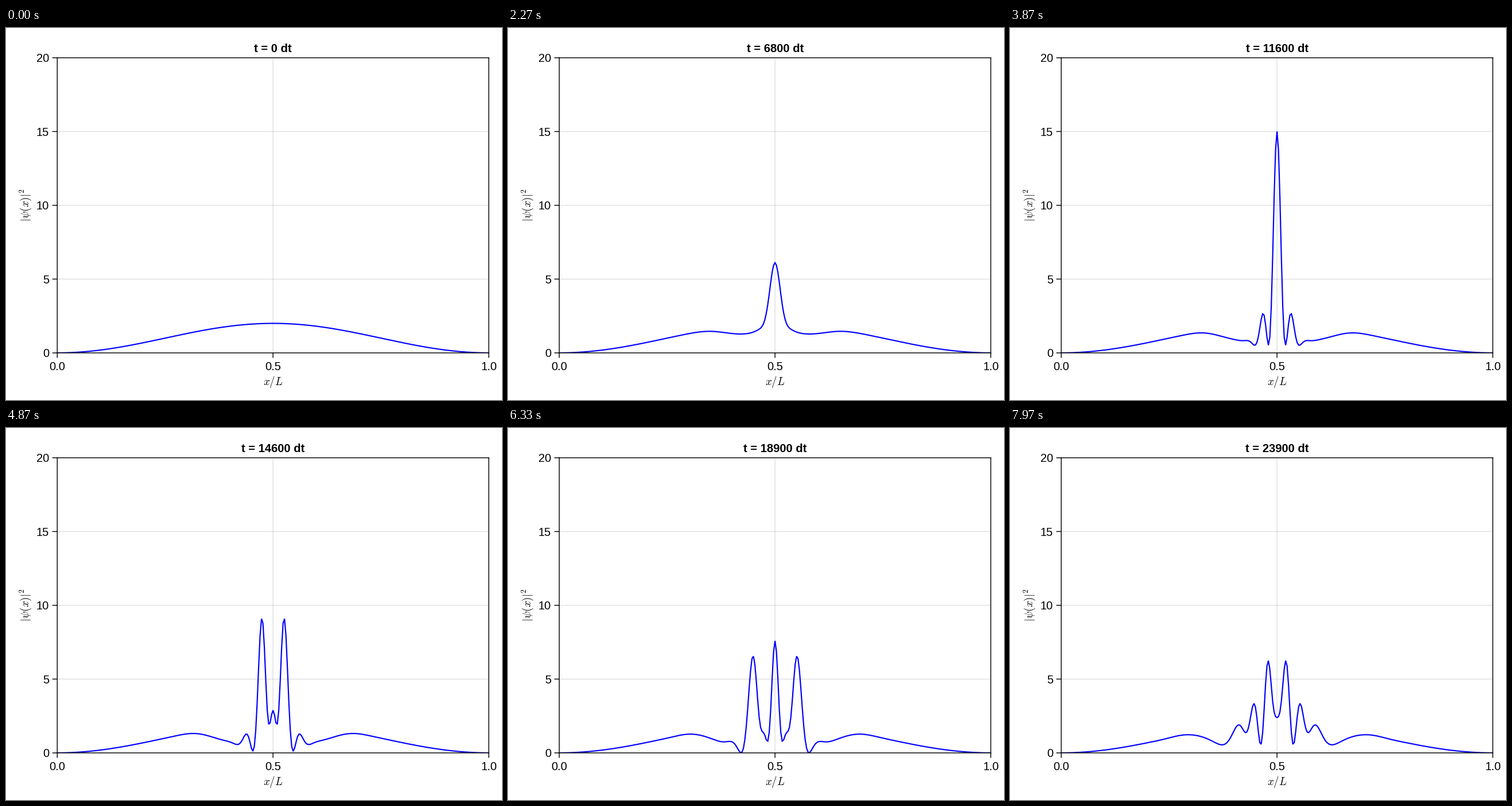
These frames come from a looping animation (864x648 px, 8 s). A matplotlib script:

```python
import numpy as np
import matplotlib.pyplot as plt
from matplotlib.animation import FuncAnimation

W, H, DPI = 864, 648, 72      # one point equals one pixel
U = 1.44                      # layout unit in pixels
LEFT, RIGHT, TOP, BOTTOM = 62 * U, 584 * U, 36 * U, 393 * U
FRAMES, LOOP_MS, STEPS = 240, 8000, 100

plt.rcParams["font.family"] = "Liberation Sans"
plt.rcParams["mathtext.fontset"] = "cm"

# Particle in a box with a Gaussian well, on a finite-difference grid
NX, DT = 301, 1e-7
x = np.linspace(0, 1, NX)
dx = x[1] - x[0]
well = -1e4 * np.exp(-((x - 0.5) ** 2) / (2 * 0.05 ** 2))
hop = np.full(NX - 3, -0.5 / dx ** 2)
hamiltonian = np.diag(well[1:-1] + 1 / dx ** 2) + np.diag(hop, 1) + np.diag(hop, -1)
energy, modes = np.linalg.eigh(hamiltonian)
weights = modes.T @ (np.sqrt(2) * np.sin(np.pi * x[1:-1]))


def density(n):
    """Normalised |psi|^2 after n explicit Euler steps."""
    psi = modes @ (weights * (1 - 1j * energy * DT) ** n)
    p = np.abs(psi) ** 2
    return np.pad(p / (p.sum() * dx), 1)


fig = plt.figure(figsize=(W / DPI, H / DPI), dpi=DPI, facecolor="white")
ax = fig.add_axes([LEFT / W, 1 - BOTTOM / H, (RIGHT - LEFT) / W, (BOTTOM - TOP) / H])
ax.set(xlim=(0, 1), ylim=(0, 20), xticks=[], yticks=[])
for spine in ax.spines.values():
    spine.set(linewidth=U, snap=False, zorder=5)


def label(px, py, text, **style):
    style = {"fontsize": 14 * U, "ha": "center", "va": "baseline", **style}
    return fig.text(px / W, 1 - py / H, text, **style)


def rule(xs, ys, **style):
    line = plt.Line2D(np.array(xs) / W, 1 - np.array(ys) / H, transform=fig.transFigure,
                      linewidth=U, snap=False, solid_capstyle="butt", **style)
    line.set_clip_on(False)
    ax.add_line(line)


GRID = {"color": "black", "alpha": 0.12, "zorder": 1}
TICK = {"color": "black", "zorder": 5}

for value in (0, 0.5, 1):
    px = LEFT + value * (RIGHT - LEFT)
    rule([px, px], [BOTTOM, BOTTOM + 6 * U], **TICK)
    label(px, 596.5, f"{value:.1f}")
    if value == 0.5:
        rule([px, px], [TOP, BOTTOM], **GRID)

for value in range(0, 21, 5):
    py = BOTTOM - value / 20 * (BOTTOM - TOP)
    rule([LEFT - 6 * U, LEFT], [py, py], **TICK)
    label(LEFT - 10 * U, py + 7.2, str(value), ha="right")
    if 0 < value < 20:
        rule([LEFT, RIGHT], [py, py], **GRID)

MID = (LEFT + RIGHT) / 2
label(MID, 622, "$x/L$", fontsize=19)
label(34, (TOP + BOTTOM) / 2, r"$|\psi(x)|^2$", fontsize=19, rotation=90, va="center")
title = label(MID, 41.5, "", fontweight="bold")
curve, = ax.plot(x, density(0), color="blue", linewidth=1.5 * U, zorder=3,
                 solid_joinstyle="miter", solid_capstyle="butt")


def draw(frame):
    n = frame * STEPS
    curve.set_ydata(density(n))
    title.set_text(f"t = {n} dt")
    return curve, title


anim = FuncAnimation(fig, draw, frames=FRAMES, interval=LOOP_MS / FRAMES,
                     init_func=lambda: draw(0), repeat=True, repeat_delay=0, blit=False)
plt.show()
```
